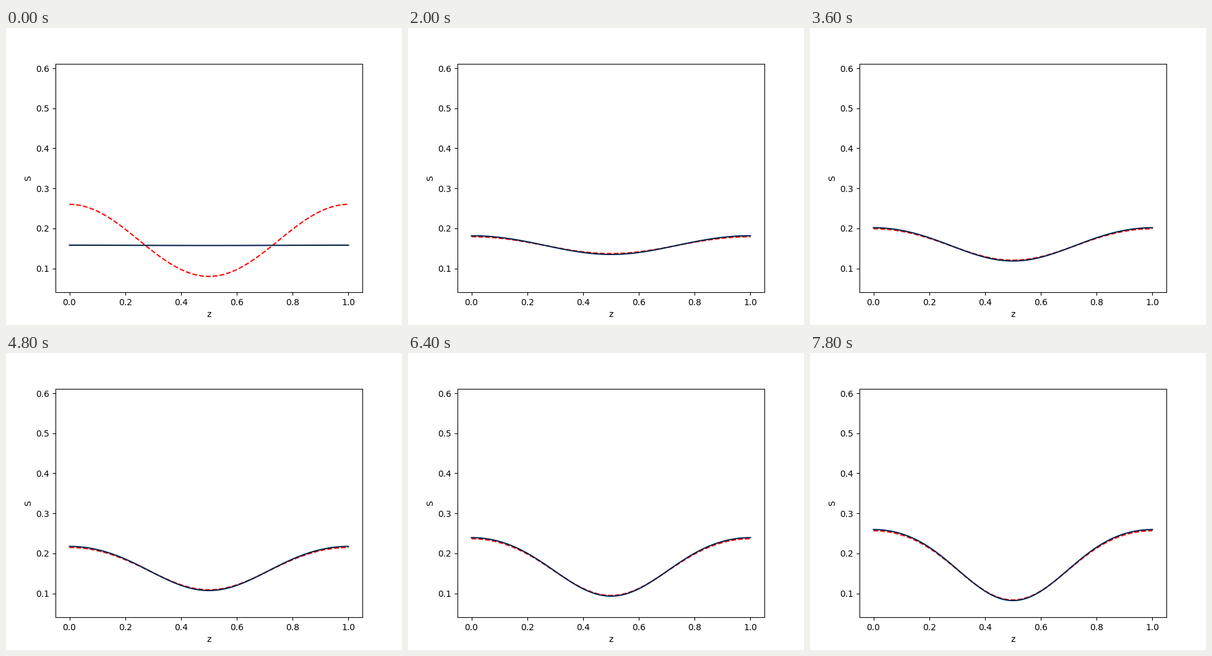
Animation, 640 px wide and 480 px high, one loop 8 s. Source, as a matplotlib script:

```python
import numpy as np
import matplotlib.pyplot as plt
from matplotlib.animation import FuncAnimation

FRAMES = 40
STEP_MS = 200

z = np.linspace(0, 1, 101)
theta = 2 * np.pi * z
start = 0.17 + 0.09 * np.cos(theta)


def profile(n):
    """Profile after n steps: a growing cosine with a sharpening trough."""
    top = 0.158 + 0.00227 * n + 8.5e-6 * n**2
    bottom = 0.1572 - 0.00234 * n + 1.06e-5 * n**2
    second = -6.2e-6 * n**2
    mean = (top + bottom) / 2 - second
    amp = (top - bottom) / 2
    return mean + amp * np.cos(theta) + second * np.cos(2 * theta)


fig, ax = plt.subplots(figsize=(6.4, 4.8), dpi=100)
previous, = ax.plot(z, start, "--", color="red", lw=1.5)
current, = ax.plot(z, profile(0), color="#03234b", lw=1.5)
ax.set_ylim(0.0402, 0.6115)
ax.set_xlabel("z")
ax.set_ylabel("S")


def draw(n):
    previous.set_ydata(profile(n - 1) if n else start)
    current.set_ydata(profile(n))
    return previous, current


anim = FuncAnimation(fig, draw, frames=FRAMES, interval=STEP_MS,
                     init_func=lambda: draw(0), repeat=True, repeat_delay=0)
plt.show()
```
